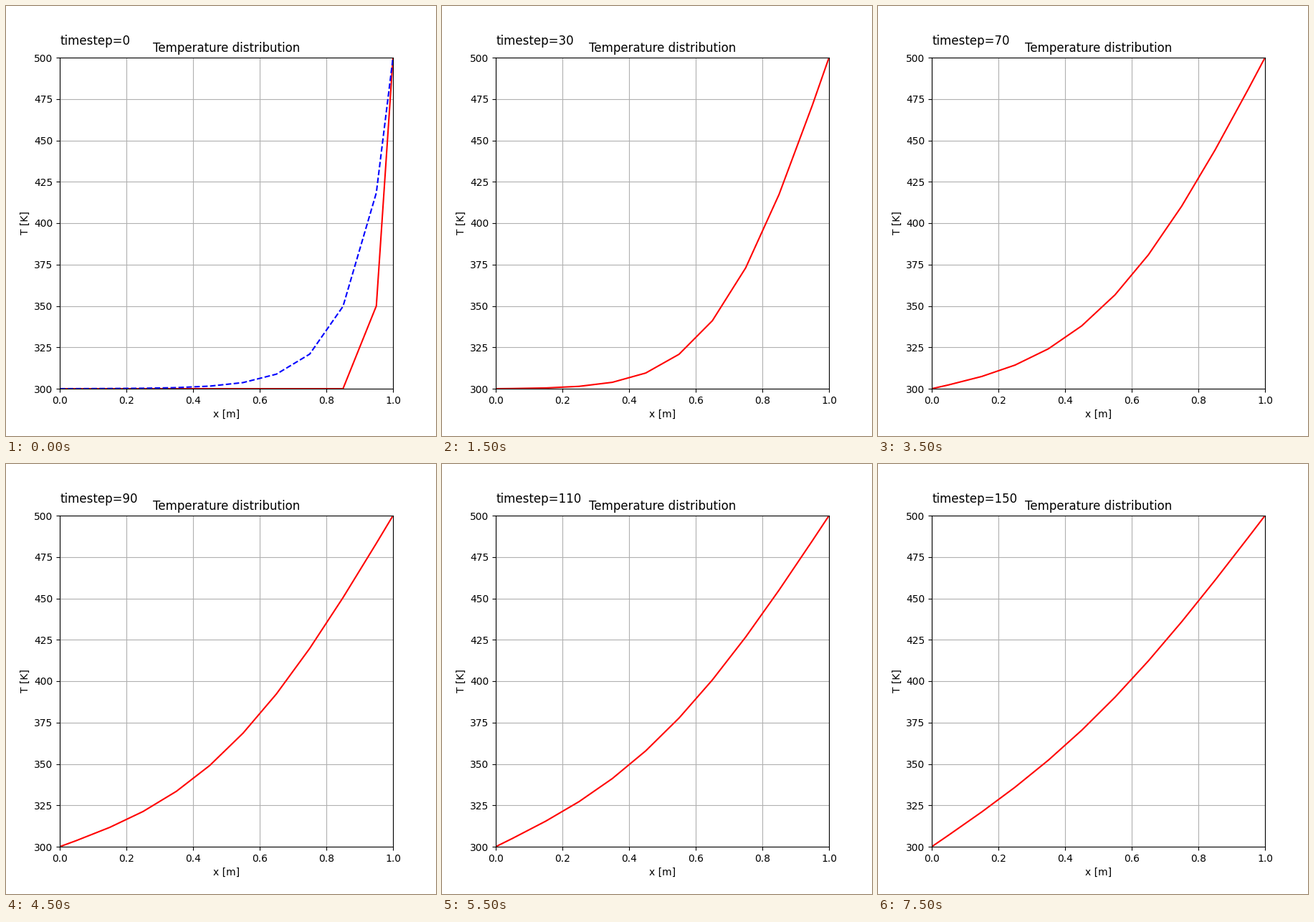
Write a matplotlib script that moves like this. It is 600 px wide and 600 px high and loops after 8000 ms.

```python
import numpy as np
import matplotlib.pyplot as plt
from matplotlib.animation import FuncAnimation

N = 10                      # control volumes
T_LEFT, T_RIGHT = 300.0, 500.0
R = 0.125                   # explicit diffusion number
R_IMPLICIT = 10 * R
FRAMES, STRIDE, INTERVAL = 16, 10, 500

x = np.concatenate(([0.0], (np.arange(N) + 0.5) / N, [1.0]))

# Laplacian on cell centres, walls half a cell away
lap = np.diag(np.full(N, -2.0)) + np.eye(N, k=1) + np.eye(N, k=-1)
lap[0, 0] = lap[-1, -1] = -3.0
source = np.zeros(N)
source[0], source[-1] = 2 * T_LEFT, 2 * T_RIGHT


def with_walls(temp):
    return np.concatenate(([T_LEFT], temp, [T_RIGHT]))


def explicit_profiles():
    temp = np.full(N, T_LEFT)
    profiles = []
    for step in range((FRAMES - 1) * STRIDE + 1):
        temp = temp + R * (lap @ temp + source)
        if step % STRIDE == 0:
            profiles.append(with_walls(temp))
    return profiles


def implicit_profile():
    start = np.full(N, T_LEFT)
    return with_walls(np.linalg.solve(np.eye(N) - R_IMPLICIT * lap,
                                      start + R_IMPLICIT * source))


profiles = explicit_profiles()

fig, ax = plt.subplots(figsize=(6, 6), dpi=100)
ax.set(xlim=(0, 1), ylim=(300, 500), xlabel="x [m]", ylabel="T [K]",
       title="Temperature distribution")
ax.grid(True)

explicit_line, = ax.plot(x, profiles[0], "r")
implicit_line, = ax.plot(x, implicit_profile(), "b--")
label = ax.text(0, 508, "", fontsize=12)


def update(i):
    explicit_line.set_ydata(profiles[i])
    implicit_line.set_visible(i == 0)
    label.set_text(f"timestep={i * STRIDE}")
    return explicit_line, implicit_line, label


anim = FuncAnimation(fig, update, frames=FRAMES, interval=INTERVAL,
                     repeat=True, repeat_delay=0)
plt.show()
```
